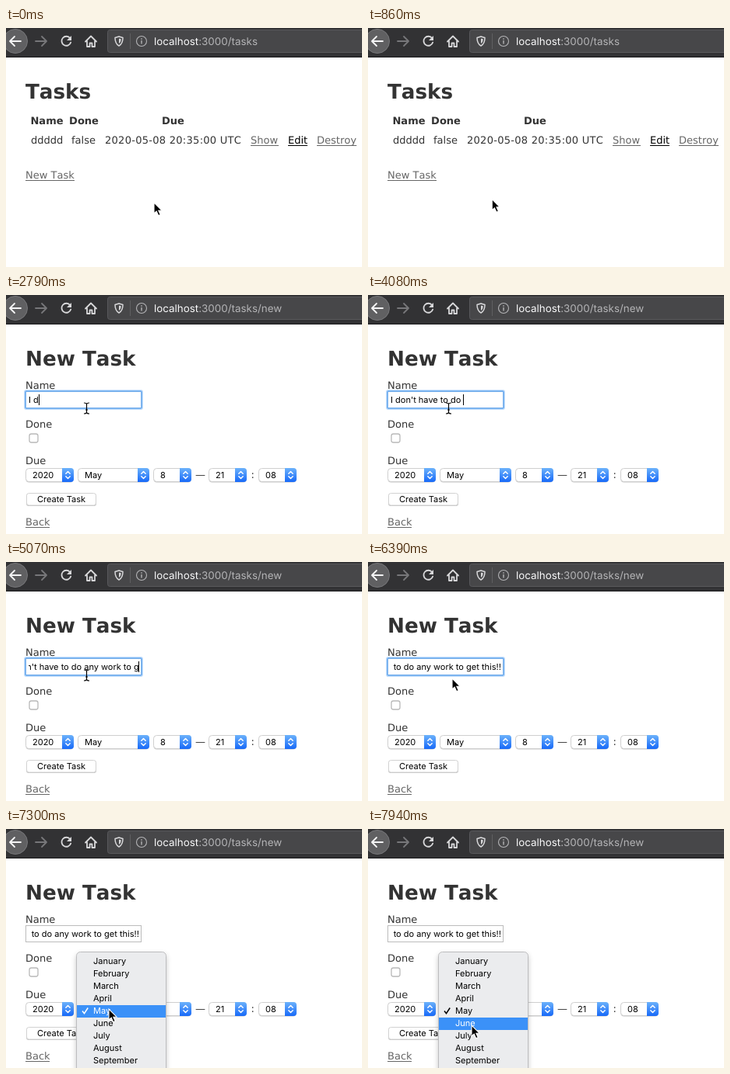
An HTML page for the animation above (8 s loop, 457 by 308 pixels).

```html
<!DOCTYPE html>
<html lang="en">
<head>
<meta charset="utf-8">
<title>New task form</title>
<style>
  html, body { margin: 0; width: 100%; height: 100%; overflow: hidden; background: #fff; }
  svg { display: block; width: 457px; height: 308px; }
  text { white-space: pre; text-rendering: geometricPrecision; }
  .page { font: 13px "DejaVu Sans", sans-serif; font-kerning: none; fill: #333; }
  .bold { font-weight: bold; }
  .title { font-size: 26.2px; font-weight: bold; }
  .ui { font: 11px Inter, sans-serif; fill: #000; }
  .url { font: 13.4px Inter, sans-serif; fill: #b4b4b6; }
  .mid { text-anchor: middle; }
  .icon { fill: none; stroke: #d8d8da; stroke-width: 1.8; stroke-linecap: round; stroke-linejoin: round; }
</style>
</head>
<body>
<svg id="stage" viewBox="0 0 457 308" xmlns="http://www.w3.org/2000/svg"></svg>
<script>
const LOOP = 8000;
const MONTHS = ['January', 'February', 'March', 'April', 'May', 'June', 'July', 'August', 'September'];
const MAY = 4, JUNE = 5;

// [first key, last key, text]
const TYPING = [
  [2550, 2550, 'I '], [2790, 2790, 'd'], [2870, 3010, "on'"],
  [3190, 3990, 't have to do'], [4050, 4260, ' any'],
  [4410, 5070, ' work to g'], [5130, 5210, 'et '],
  [5270, 5620, 'thi'], [5770, 5770, 's'], [6120, 6180, '!!']
];

// [time, x, y] of the pointer
const PATH = [
  [0, 190, 225], [240, 190, 225], [270, 187, 225], [650, 187, 225],
  [740, 184, 229], [1150, 66, 189], [1330, 66, 189],
  [1700, 103.5, 146], [5960, 103.5, 146], [5970, 103.5, 145],
  [6360, 103.5, 145], [6390, 108, 150], [6880, 102, 269.5], [7010, 102, 270],
  [7180, 132, 232], [7430, 132, 232], [7580, 133, 253], [LOOP, 133, 253]
];

const text = (x, y, s, cls, extra = '') => `<text x="${x}" y="${y}" class="${cls}" ${extra}>${s}</text>`;
const box = (x, y, w, h, fill, extra = '') =>
  `<rect x="${x}" y="${y}" width="${w}" height="${h}" fill="${fill}" ${extra}/>`;
const group = (id, body) => `<g id="${id}">${body}</g>`;
const icon = (d, extra = '') => `<path class="icon" d="${d}" ${extra}/>`;

const link = (x, y, s, w, color, id = '') =>
  `<g id="${id}" style="fill:${color}">` +
  text(x, y, s, 'page', 'style="fill:inherit"') + `<rect x="${x}" y="${y + 2}" width="${w}" height="1"/></g>`;

function select(x, w, value, id = '') {
  const r = x + w, c = r - 7.5;
  return box(x + .5, 224, w - 1, 17.5, '#c4c4c4', 'rx="4"') +
    box(x + .5, 223.5, w - 1, 17, '#fff', 'rx="4" stroke="#cfcfcf"') +
    `<path d="M${r - 15} 223H${r - 4}a4 4 0 0 1 4 4v10a4 4 0 0 1 -4 4H${r - 15}z" fill="url(#cap)"/>` +
    `<path d="M${c - 2.7} 230.3l2.7-2.8 2.7 2.8M${c - 2.7} 233.7l2.7 2.8 2.7-2.8" fill="none" stroke="#fff" stroke-width="1.4" stroke-linecap="round" stroke-linejoin="round"/>` +
    text(x + 9, 236, value, 'ui', `id="${id}"`);
}

const toolbar =
  box(0, 0, 457, 38, '#323234') + box(0, 37, 457, 1, '#18181a') +
  '<circle cx="12" cy="17" r="15.5" fill="#606062" stroke="#77777a"/>' +
  icon('M19 17H5.5M11 11L5 17L11 23', 'style="stroke:#f4f4f5"') +
  icon('M38 17H51.500M46 11L52 17L46 23', 'style="stroke:#77777a"') +
  icon('M82.300 13.200A6 6 0 1 0 83.200 18.500') +
  '<path d="M84 10v6h-6z" fill="#d8d8da"/>' +
  icon('M102 17.500L109 10.500L116 17.500M104 16.500V24H107.500V19.500H110.500V24H114V16.500') +
  box(130.500, 2.500, 340, 29, '#474749', 'rx="3" stroke="#59595c"') +
  icon('M145 11L150 12.500C150 18 148.500 21 145 23C141.500 21 140 18 140 12.500Z', 'style="stroke-width:1.5"') +
  '<path d="M145 13.500v6.500c1.800-1.300 2.600-3 2.700-5.700z" fill="#d8d8da"/>' +
  box(159, 7, 1, 20, '#5f5f62') +
  '<circle cx="174" cy="17" r="6.500" fill="none" stroke="#b4b4b6" stroke-width="1.1"/>' +
  box(173.300, 16, 1.400, 4.500, '#b4b4b6') + box(173.300, 13.300, 1.400, 1.500, '#b4b4b6') +
  text(190, 22, '<tspan fill="#f9f9fa">localhost</tspan>:3000/tasks<tspan id="urlEnd"></tspan>', 'url');

const listPage =
  text(25, 91, 'Tasks', 'page title') +
  text(52.5, 124, 'Name', 'page bold mid') + text(100, 124, 'Done', 'page bold mid') +
  text(214.5, 124, 'Due', 'page bold mid') +
  text(32, 149, 'ddddd', 'page') + text(84, 149, 'false', 'page') +
  text(127, 149, '2020-05-08 20:35:00 UTC', 'page', 'letter-spacing=".28"') +
  link(314, 149, 'Show', 36, '#666') + link(362, 149, 'Edit', 25, '#000') +
  link(399, 149, 'Destroy', 51, '#666') +
  box(25, 182, 63, 16, '#000', 'id="hoverBg"') + link(25, 194, 'New Task', 63, '#666', 'newLink');

const nameField =
  box(25.5, 124.5, 148, 21, '#fff', 'stroke="#bcbcbc"') +
  group('ring',
    box(24.5, 123.5, 150, 23, 'none', 'rx="1.5" stroke="#9cc8f8" stroke-width="3" opacity=".6"') +
    box(25, 124, 149, 22, 'none', 'rx="1" stroke="#6aaaf0" stroke-width="1.5"')) +
  `<g clip-path="url(#inputClip)">${text(29, 139, '', 'ui', 'id="typed"')}</g>` +
  box(29, 128, 1, 14, '#000', 'id="caret"');

const formPage =
  text(25, 91, 'New Task', 'page title') +
  text(25, 121, 'Name', 'page') + nameField +
  text(25, 171, 'Done', 'page') +
  box(30, 179, 11, 11, '#fff', 'rx="2.5" stroke="#b9b9b9" stroke-width="1.3"') +
  text(25, 218, 'Due', 'page') +
  select(25, 62, '2020') + select(92, 92, 'May') + select(189, 49, '8') +
  text(243, 236, '—', 'page') + select(260, 49, '21') + text(314.500, 236, ':', 'page') +
  select(324, 49, '', 'minute') +
  box(26, 256, 90, 16, '#c8c8c8', 'rx="3"') +
  box(26.5, 255.5, 89, 15.500, '#fff', 'rx="3" stroke="#d2d2d2"') +
  text(71, 267, 'Create Task', 'ui mid') +
  link(25, 297, 'Back', 31, '#666', 'back');

const popup =
  box(90.5, 158.5, 115, 170, '#ebecee', 'rx="5" stroke="#bdbdbf" filter="url(#soft)"') +
  box(91, 0, 114, 16, '#3b91f8', 'id="bar"') +
  MONTHS.map((m, i) => text(112, 174 + 16 * i, m, 'ui month')).join('') +
  '<path id="tick" d="M98 234.500l2.500 3.200 4.700-7.200" fill="none" stroke-width="1.500"/>';

const pointers =
  group('arrow', '<path d="M0 0V14L3.200 11.200L5.700 16.700L8.200 15.600L5.800 10.200H10Z" fill="#000" stroke="#fff" stroke-width="1.100"/>') +
  group('beam', '<path d="M-3.500-7Q-.5-7 0-5.500Q.5-7 3.500-7M-3.500 7Q-.5 7 0 5.500Q.5 7 3.500 7M0-5.500V5.500M-1.500 2H1.500" fill="none" stroke="#000" stroke-width="1.200"/>') +
  group('hand', '<path d="M-1.300 1Q0-1 1.300 1V6Q2.500 4.800 3.800 6.300Q5.200 5.300 6.300 7Q8.300 6.500 8.300 9V12Q8 14 7 16H-.5Q-2 13.500-4.500 10.500Q-5-.5+8.500-3 8.300L-1.300 10Z" fill="#fff" stroke="#000"/>'.replace('Q-5-.5+8.500-3 8.300', 'Q-4.500 8-3 8.300'));

const stage = document.getElementById('stage');
stage.innerHTML =
  `<defs>
    <linearGradient id="cap" x2="0" y2="1"><stop stop-color="#6cb2fb"/><stop offset="1" stop-color="#1769f8"/></linearGradient>
    <clipPath id="inputClip"><rect x="29" y="126" width="142" height="18"/></clipPath>
    <filter id="soft" x="-10%" y="-10%" width="120%" height="120%"><feDropShadow dx="0" dy="3" stdDeviation="3" flood-opacity=".22"/></filter>
  </defs>` +
  box(0, 0, 457, 308, '#fff') + toolbar + group('list', listPage) + group('form', formPage) +
  group('popup', popup) + pointers;

const $ = id => document.getElementById(id);
const months = [...document.querySelectorAll('.month')];
const show = (id, on) => { $(id).style.display = on ? '' : 'none'; };

function pointerAt(t) {
  const i = Math.max(1, PATH.findIndex(p => p[0] > t));
  const [t0, x0, y0] = PATH[i - 1], [t1, x1, y1] = PATH[i];
  const k = (t - t0) / (t1 - t0), e = k * k * (3 - 2 * k);
  return [x0 + (x1 - x0) * e, y0 + (y1 - y0) * e];
}

function typedAt(t) {
  return TYPING.map(([a, b, s]) => {
    if (t < a) return '';
    const step = (b - a) / Math.max(1, s.length - 1);
    return step ? s.slice(0, Math.floor((t - a) / step + 1e-6) + 1) : s;
  }).join('');
}

function drawInput(t) {
  const focused = t >= 1740 && t < 7270;
  const typed = $('typed');
  typed.textContent = typedAt(t);
  const width = typed.getComputedTextLength();
  const x = Math.min(29, 170.8 - width);
  typed.setAttribute('x', x);
  $('caret').setAttribute('x', Math.min(170, Math.round(x + width)));
  const blinkedOff = (t >= 2310 && t < 2550) || (t >= 6390 && t < 6960);
  show('caret', focused && !blinkedOff);
  show('ring', focused);
}

function drawPopup(t, y) {
  show('popup', t >= 7300);
  const row = y >= 243 ? JUNE : MAY;
  const lit = t < 7880 || t >= 7940;
  $('bar').setAttribute('y', 163 + 16 * row);
  show('bar', lit);
  months.forEach((m, i) => { m.style.fill = lit && i === row ? '#fff' : '#000'; });
  $('tick').setAttribute('stroke', lit && row === MAY ? '#fff' : '#000');
}

function render(t) {
  const onForm = t >= 1320;
  const [x, y] = pointerAt(t);
  const hover = !onForm && x >= 25 && x <= 88 && y >= 182 && y <= 198;
  const beam = t > 1350 && t < 6390 && y <= 147;

  show('list', !onForm);
  show('form', onForm);
  $('urlEnd').textContent = onForm ? '/new' : '';
  show('hoverBg', hover);
  $('newLink').style.fill = hover ? '#fff' : '#666';

  // a cached preview of the form is replaced by the fresh page
  const fresh = t >= 1410;
  $('minute').textContent = fresh ? '08' : '07';
  $('back').style.fill = fresh ? '#666' : '#000';

  drawInput(t);
  drawPopup(t, y);

  const active = hover ? 'hand' : beam ? 'beam' : 'arrow';
  for (const id of ['arrow', 'beam', 'hand']) show(id, id === active);
  $(active).setAttribute('transform', `translate(${x.toFixed(2)} ${y.toFixed(2)})`);
}

const start = performance.now();
function tick() {
  render((performance.now() - start) % LOOP);
  requestAnimationFrame(tick);
}
tick();
</script>
</body>
</html>
```
